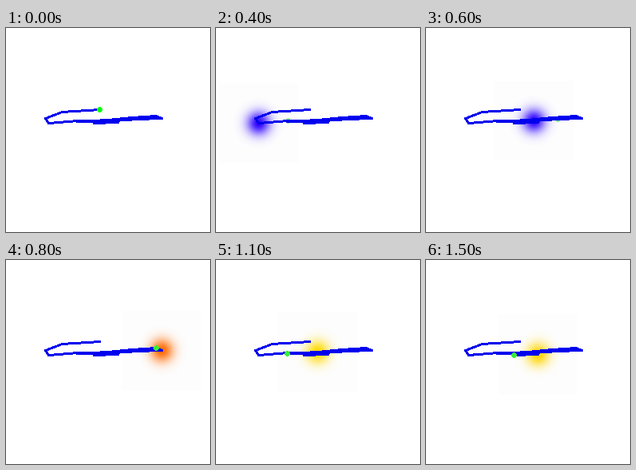
An HTML page for the animation above (1600 ms loop, 256 by 256 pixels).

```html
<!DOCTYPE html>
<html>
<head>
<meta charset="utf-8">
<style>
  html, body { margin: 0; width: 100%; height: 100%; overflow: hidden; background: #fff; }
  svg { display: block; }
</style>
</head>
<body>
<svg width="256" height="256" viewBox="-.5 -.5 256 256">
  <radialGradient id="fade"></radialGradient>
  <g id="glow">
    <rect x="-50" y="-50" width="100" height="100" fill="#fdfdfd"/>
    <circle r="32" fill="url(#fade)"/>
  </g>
  <polyline id="trail" fill="none" stroke="#0000ee" stroke-width="3" stroke-linejoin="round"
    stroke-linecap="round" shape-rendering="crispEdges"
    points="117,102 70,105 49,113 53,119 90,116 135,116 165,114 195,113
            188,110 158,112 127,115 89,117 107,117 135,116 140,118 110,119"/>
  <circle id="dot" r="3.4" shape-rendering="crispEdges"/>
</svg>
<script>
const STEP = 100, RADIUS = 32, SIGMA = 10, BANDS = 16;
const [fade, glow, trail, dot] = ['fade', 'glow', 'trail', 'dot'].map(id => document.getElementById(id));
const stops = [...trail.points];

// Gaussian falloff, tinted through currentColor
for (let i = 0; i <= BANDS; i++) {
  const stop = document.createElementNS('http://www.w3.org/2000/svg', 'stop');
  const r = i / BANDS * RADIUS;
  stop.setAttribute('offset', i / BANDS);
  stop.setAttribute('stop-color', 'currentColor');
  stop.setAttribute('stop-opacity', Math.exp(-r * r / (2 * SIGMA * SIGMA)));
  fade.append(stop);
}

function place(shape, { x, y }) {
  shape.setAttribute('transform', `translate(${x} ${y})`);
}

function draw() {
  const i = Math.floor(performance.now() / STEP) % stops.length;
  const here = stops[i], last = stops[Math.max(i - 1, 0)];
  const dx = here.x - last.x, dy = here.y - last.y;
  const rightward = dx > 0;

  // the glow's hue follows the heading: blue to the right, yellow to the left
  const tilt = dx ? Math.atan(dy / dx) * 180 / Math.PI : 0;
  fade.style.color = `hsl(${(rightward ? 246 : 48) - tilt}, 100%, 50%)`;
  glow.style.display = i ? '' : 'none';
  place(glow, last);

  place(dot, here);
  dot.setAttribute('fill', rightward ? '#86ea90' : i ? '#38ee38' : '#00ff00');
  if (rightward) trail.before(dot);
  else trail.after(dot);
  requestAnimationFrame(draw);
}
draw();
</script>
</body>
</html>
```
